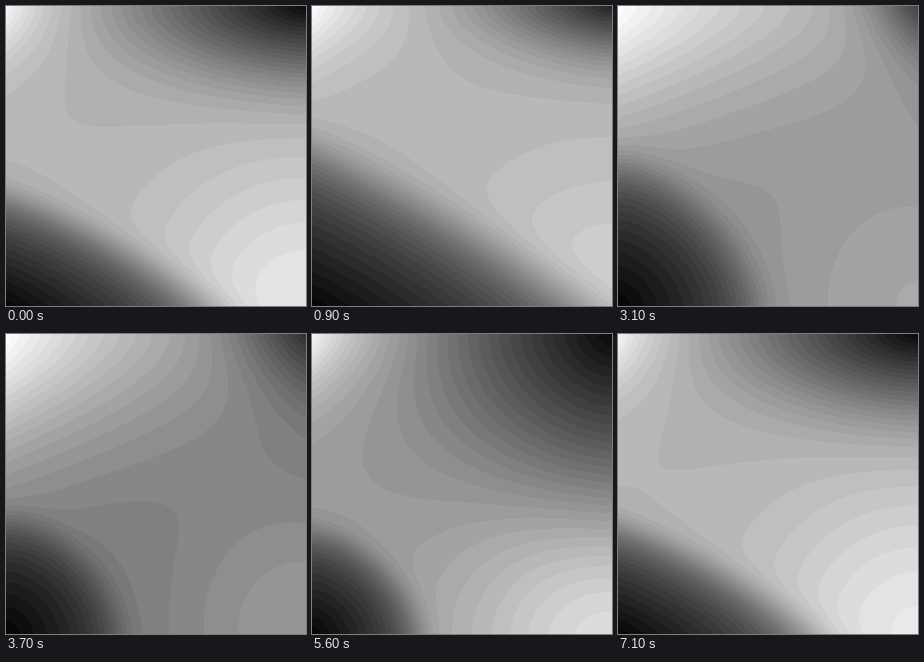
Animation, 300 px wide and 300 px high, one loop 7.2 s. Source, as an HTML page with a canvas:

```html
<!DOCTYPE html>
<html lang="en">
<head>
<meta charset="utf-8">
<title>Drifting grey gradient</title>
<style>
  html, body { margin: 0; width: 100%; height: 100%; overflow: hidden; background: #999; }
  canvas { display: block; width: 100vw; height: 100vh; }
</style>
</head>
<body>
<canvas id="stage" width="300" height="300"></canvas>
<script>
const SIZE = 300, LOOP = 7200, STEP = 100, BANDS = 36;

const ctx = document.getElementById('stage').getContext('2d');
const image = ctx.createImageData(SIZE, SIZE);
const pixels = new Uint32Array(image.data.buffer);

// Periodic motion: a plain swing, and a swell from lo to hi that peaks once per loop.
const swing = (t, peak) => Math.cos((t - peak) / LOOP * 2 * Math.PI);
const wave = (t, mean, amp, peak) => mean + amp * swing(t, peak);
const swell = (t, lo, hi, peak, tight) =>
  lo + (hi - lo) * Math.exp(tight * (swing(t, peak) - 1));

// Rounded corner distance: 1 on a curve reaching a along one side and b along the other.
const reach = (x, y, a, b, p) => Math.pow(Math.pow(x / a, p) + Math.pow(y / b, p), 1 / p);

// Levels off softly at 1.
const soft = s => s / Math.pow(1 + Math.pow(s, 6), 1 / 6);

function sceneAt(t) {
  return {
    mid: swell(t, 186, 104, 4200, 1.5),
    // white light, upper left
    lightX: swell(t, 42, 195, 3200, 1.3),
    lightY: swell(t, 52, 118, 3600, 2),
    // pale glow, lower right
    glow: wave(t, 42, 28, 5700),
    // shadow, lower left
    lowX: swell(t, 75, 305, 1150, 1),
    lowY: swell(t, 110, 260, 1900, 2.5),
    lowBend: wave(t, 1.42, 0.35, 4400),
    // shadow, upper right
    highX: wave(t, 160, 100, 6400),
    highY: swell(t, 55, 215, 5600, 1.5),
    highBend: wave(t, 1.5, 0.25, 6400),
    highFloor: wave(t, 0.2, 0.19, 2800)
  };
}

function grey(s, x, y) {
  const right = SIZE - x, below = SIZE - y;
  const light = Math.exp(-x / s.lightX - Math.pow(y / s.lightY, 1.5));
  const glow = s.glow * Math.exp(-(right * right + below * below) / 21000);
  const base = s.mid + (255 - s.mid) * light + glow;

  const low = reach(x, below, s.lowX, s.lowY, s.lowBend);
  const high = reach(right, y, s.highX, s.highY, s.highBend);
  const lowShade = soft(0.03 + 0.53 * low + 0.45 * Math.pow(low, 5));
  const highShade = soft(s.highFloor + (1 - s.highFloor) * high);
  return base * lowShade * highShade;
}

function draw(t) {
  const scene = sceneAt(t), tone = 255 / BANDS;
  for (let y = 0; y < SIZE; y++) {
    for (let x = 0; x < SIZE; x++) {
      const band = Math.round(grey(scene, x + 0.5, y + 0.5) / tone);
      const g = Math.min(255, Math.round(band * tone));
      pixels[y * SIZE + x] = 0xff000000 | g << 16 | g << 8 | g;
    }
  }
  ctx.putImageData(image, 0, 0);
}

const start = performance.now();
let shown = -1;
function tick() {
  const t = Math.floor((performance.now() - start) % LOOP / STEP) * STEP;
  if (t !== shown) draw(shown = t);
  requestAnimationFrame(tick);
}
tick();
</script>
</body>
</html>
```
